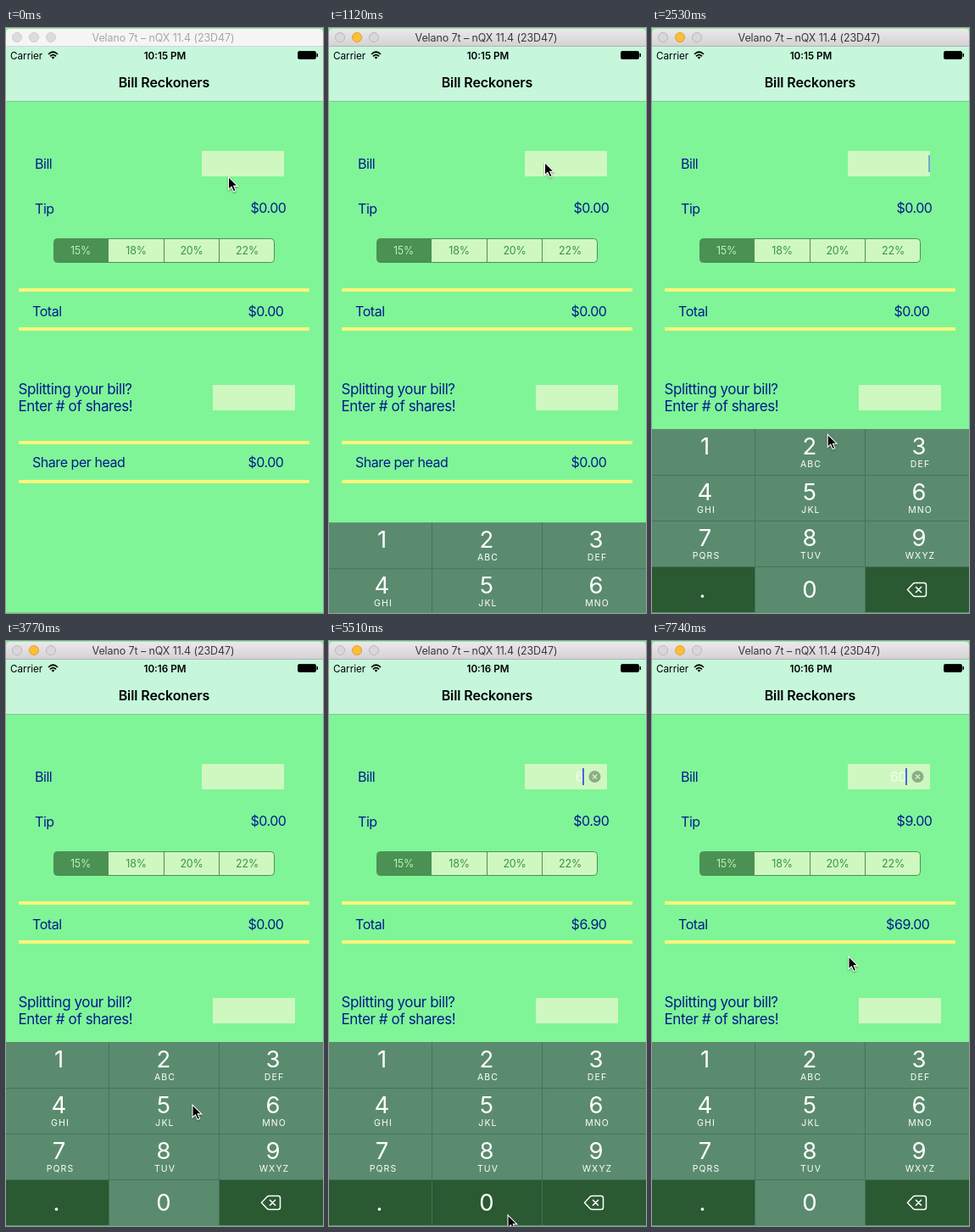
An HTML page for the animation above (8000 ms loop, 374 px wide and 690 px high).

```html
<!DOCTYPE html>
<html lang="en">
<head>
<meta charset="utf-8">
<title>Bill Reckoners</title>
<style>
html, body { margin: 0; width: 100%; height: 100%; overflow: hidden; background: #7ff597; }
svg { display: block; width: 374px; height: 690px; }
text { font: 16px Inter, Roboto, sans-serif; letter-spacing: -.45px; fill: #041c8c; }
.end { text-anchor: end; }
.mid, .key text { text-anchor: middle; }
.window { font-size: 12.5px; letter-spacing: -.1px; }
.heading { font-weight: 600; letter-spacing: -.1px; fill: #000; }
.prompt { font-size: 17px; letter-spacing: -.4px; }
.status { font-size: 11.7px; letter-spacing: 0; fill: #000; }
.bold { font-weight: 600; }
.segment { font-size: 12.5px; letter-spacing: -.2px; fill: #36954b; }
.key rect { fill: #5b8b6f; }
.key.dark rect { fill: #2a5932; }
.key text { fill: #fff; font-size: 27.5px; letter-spacing: 0; }
.key .letters { font-size: 10.5px; letter-spacing: 1.1px; }
</style>
</head>
<body>
<svg viewBox="0 0 374 690">
  <defs>
    <linearGradient id="bar" x2="0" y2="1">
      <stop stop-color="#ebe9eb"/><stop offset="1" stop-color="#d3d1d3"/>
    </linearGradient>
  </defs>
  <rect width="374" height="690" fill="#7ff597"/>

  <path id="titlebar" d="M0 22V6Q0 1 5 1H369Q374 1 374 6V22Z"/>
  <path id="barEdge" d="M0 21.5H374"/>
  <g id="dots"><circle cx="13" cy="11" r="5.5"/><circle cx="33" cy="11" r="5.5"/><circle cx="53" cy="11" r="5.5"/></g>
  <text id="windowTitle" class="window mid" x="185.5" y="16">Velano 7t – nQX 11.4 (23D47)</text>

  <path d="M0 22H374V86H0Z" fill="#c6f7db"/>
  <path d="M0 86.5H374" stroke="#80c896"/>
  <text class="status" x="5" y="37">Carrier</text>
  <g fill="none" stroke="#000" stroke-width="1.7">
    <path d="M50 31Q55.5 25.5 61 31M52 33.3Q55.5 29.8 59 33.3"/>
    <path d="M53.6 34.5Q55.5 32.8 57.4 34.5L55.5 36.8Z" fill="#000" stroke="none"/>
  </g>
  <text id="clock" class="status bold mid" x="187.5" y="37"></text>
  <rect x="344.5" y="27.5" width="21" height="9" rx="1.5" stroke="#000" stroke-opacity=".75"/>
  <path d="M366.5 30H368V34H366.5Z"/>
  <text class="heading mid" x="186.5" y="70">Bill Reckoners</text>

  <path d="M231 145h97v30h-97ZM244 421h97v30h-97Z" fill="#cff8c0"/>
  <path d="M15 309H358M15 355H358M15 489H358M15 535H358" stroke="#fcf67b" stroke-width="4"/>
  <text x="34" y="166">Bill</text>
  <text x="34" y="219">Tip</text>
  <text id="tip" class="end" x="330.5" y="218"></text>
  <text x="31" y="340">Total</text>
  <text id="total" class="end" x="327.5" y="340"></text>
  <text class="prompt" x="14.5" y="432">Splitting your bill?</text>
  <text class="prompt" x="14.5" y="452">Enter # of shares!</text>
  <text x="31" y="518">Share per head</text>
  <text class="end" x="327.5" y="518">$0.00</text>

  <rect x="56.5" y="248.5" width="260" height="28" rx="4" fill="#cff8c0"/>
  <path d="M121 248.5H60.5q-4 0-4 4v20q0 4 4 4H121Z" fill="#4a9153"/>
  <path d="M186.5 249V276M251.5 249V276" stroke="#4a9153"/>
  <rect x="56.5" y="248.5" width="260" height="28" rx="4" fill="none" stroke="#4a9153"/>
  <text class="segment mid" x="88" y="267" style="fill:#bdf0b0">15%</text>
  <text class="segment mid" x="153.5" y="267">18%</text>
  <text class="segment mid" x="219" y="267">20%</text>
  <text class="segment mid" x="284.5" y="267">22%</text>

  <text id="bill" class="end" x="300" y="166" style="fill:#f3fdee"></text>
  <g id="clear">
    <circle cx="313.5" cy="160" r="7" fill="#8eac86"/>
    <path d="M311 157.5l5 5m0-5l-5 5" stroke="#cff8c0" stroke-width="1.3"/>
  </g>
  <rect id="caret" y="150" width="2" height="20" fill="#4168e0"/>

  <g id="keyboard"></g>
  <path id="bottomEdge" d="M0 689.5H374"/>
  <path id="cursor" d="M0 0V15L3.5 11.8L6 17.5L8.6 16.4L6.2 10.9H10.8Z" stroke="#fff" stroke-width="1.1" style="filter:drop-shadow(0 1px 1px #0006)"/>
</svg>
<script>
const LOOP = 8000;
const $ = id => document.getElementById(id);
const set = (id, attrs) => { for (const k in attrs) $(id).setAttribute(k, attrs[k]); };

// Keypad
const labels = ['1', '2 ABC', '3 DEF', '4 GHI', '5 JKL', '6 MNO', '7 PQRS', '8 TUV', '9 WXYZ', '.', '0', ''];
const left = [0, 122, 252, 374], middle = [62.5, 186, 315];
$('keyboard').innerHTML = labels.map((label, i) => {
  const col = i % 3, row = Math.floor(i / 3), y = 473 + row * 54;
  const [digit, letters = ''] = label.split(' ');
  const x = digit === '.' ? 59.5 : middle[col];
  return `<g class="key" id="key${i}">
    <rect x="${left[col]}" y="${y}" width="${left[col + 1] - left[col]}" height="54"/>
    <text x="${x}" y="${y + (row === 3 ? 37 : 30)}">${digit}</text>
    <text class="letters" x="${middle[col] + 1.5}" y="${y + 45}">${letters}</text></g>`;
}).join('') + `<path d="M0 527.5H374M0 581.5H374M0 635.5H374M121.5 473V690M251.5 473V690" stroke="#43735a"/>
  <path d="M301.5 662.5L308 655.5Q309 654.5 310.5 654.5H321Q323.5 654.5 323.5 657V668Q323.5 670.5 321 670.5H310.5Q309 670.5 308 669.5ZM311 659l7 7m0-7l-7 7"
    fill="none" stroke="#fff" stroke-width="1.5"/>`;
const press = (i, on) => $('key' + i).classList.toggle('dark', on);
press(9, true);
press(11, true);

// Pointer stops: time, x, y
const stops = [
  [120, 262.5, 175.5], [290, 254.5, 158.5], [1950, 254.5, 158.5], [2180, 207, 478], [2480, 207, 478],
  [2900, 212, 510], [3290, 212, 510], [3590, 220, 547], [3770, 220, 547], [3880, 202, 553],
  [3990, 210, 553], [4410, 210, 553], [4640, 270.5, 554], [4780, 270.5, 554], [5040, 211, 677],
  [7100, 211, 677], [7200, 204, 560], [7390, 232, 372], [LOOP, 232, 372]
];
function pointer(t) {
  const i = stops.findIndex(s => s[0] > t);
  if (i < 1) return stops[0].slice(1);
  const [a, b] = [stops[i - 1], stops[i]];
  const p = (t - a[0]) / (b[0] - a[0]), e = p * p * (3 - 2 * p);
  return [1, 2].map(k => a[k] + (b[k] - a[k]) * e);
}

// The caret alternates between shown and hidden at these times
const blinks = [1120, 1530, 1950, 2480, 2900, 3370, 3830, 4410, 4600, 6200, 6670, 7090, 7610];
function caretOpacity(t) {
  const n = blinks.filter(b => b <= t).length;
  if (!n) return 0;
  const fade = Math.min(1, (t - blinks[n - 1]) / 120);
  return n % 2 ? fade : 1 - fade;
}

function draw(t) {
  const active = t >= 770;
  set('titlebar', { fill: active ? 'url(#bar)' : '#f6f5f6' });
  set('barEdge', { stroke: active ? '#b3b1b3' : '#d6d5d6' });
  set('bottomEdge', { stroke: active ? '#4f985f' : '#72d688' });
  set('dots', { fill: active ? '#d9d7d9' : '#dddcdd', stroke: active ? '#bab8ba' : '#cfcecf' });
  const minimise = $('dots').children[1].style;
  minimise.fill = active ? '#fdbd38' : '';
  minimise.stroke = active ? '#dfa032' : '';
  $('windowTitle').style.fill = active ? '#3a393a' : '#a8a7a8';
  $('clock').textContent = t < 3350 ? '10:15 PM' : '10:16 PM';

  const bill = t < 4770 ? 0 : t < 5570 ? 6 : 60;
  $('bill').textContent = bill || '';
  $('tip').textContent = '$' + (bill * .15).toFixed(2);
  $('total').textContent = '$' + (bill * 1.15).toFixed(2);
  set('clear', { visibility: bill ? 'visible' : 'hidden' });
  set('caret', { x: bill ? 299 : 326, opacity: caretOpacity(t) });

  const drop = t < 1100 ? 217 : 217 * Math.exp((1100 - t) / 31);
  set('keyboard', { transform: `translate(0 ${drop})` });
  press(5, t >= 4650 && t < 4770);
  press(10, t >= 5450 && t < 5570);
  set('cursor', { transform: `translate(${pointer(t)})` });
}

function tick() {
  draw(performance.now() % LOOP);
  requestAnimationFrame(tick);
}
tick();
</script>
</body>
</html>
```
